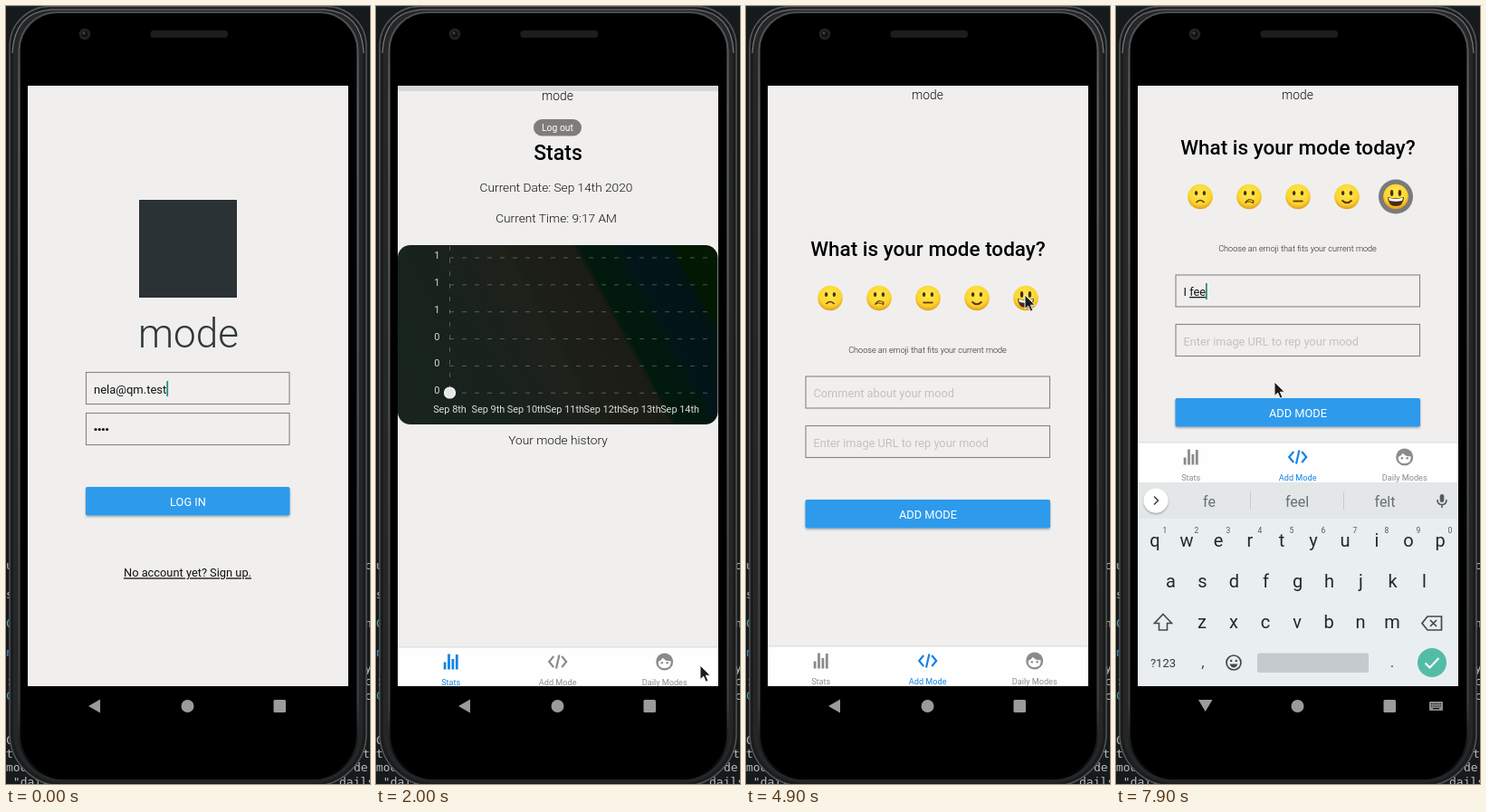
An HTML page that plays this animation: 402 by 859 pixels, repeating every 8 s.

```html
<!DOCTYPE html>
<html lang="en">
<head>
<meta charset="utf-8">
<title>Mood app demo</title>
<style>
html, body { margin: 0; width: 100%; height: 100%; overflow: hidden; background: #171a1b; }
svg { display: block; width: 402px; height: 859px; }
text { font-family: Roboto, "Noto Sans", sans-serif; white-space: pre; }
.mono { font-family: "DejaVu Sans Mono", "Noto Sans Mono", monospace; font-size: 13px; }
</style>
</head>
<body>
<svg id="stage" viewBox="0 0 402 859" xmlns="http://www.w3.org/2000/svg"></svg>
<script>
const LOOP = 8000, STEP = 100;
const INK = '#111', GREY = '#8c8b8a', BLUE = '#1683e4', KEY = '#22292c', PAPER = '#f0efee';

const tag = (name, attrs, body = '') =>
  `<${name} ${Object.entries(attrs).map(([k, v]) => `${k}="${v}"`).join(' ')}>${body}</${name}>`;
const rect = (x, y, width, height, fill, more) => tag('rect', { x, y, width, height, fill, ...more });
const disc = (cx, cy, r, fill, more) => tag('circle', { cx, cy, r, fill, ...more });
const path = (d, fill, more) => tag('path', { d, fill, ...more });
const line = (d, stroke, w, more) => path(d, 'none', { stroke, 'stroke-width': w, ...more });
const text = (x, y, s, size, fill, more) => tag('text', { x, y, 'font-size': size, fill, ...more }, s);
const mid = (x, y, s, size, fill, weight = 400, more) =>
  text(x, y, s, size, fill, { 'text-anchor': 'middle', 'font-weight': weight, ...more });
const group = (id, body, more) => tag('g', { id, ...more }, body);
const at = (x, y, body) => tag('g', { transform: `translate(${x} ${y})` }, body);

// Outline with separate top and bottom corner radii
const shell = (l, t, r, b, rt, rb) =>
  `M${l} ${t + rt}A${rt} ${rt} 0 0 1 ${l + rt} ${t}H${r - rt}A${rt} ${rt} 0 0 1 ${r} ${t + rt}` +
  `V${b - rb}A${rb} ${rb} 0 0 1 ${r - rb} ${b}H${l + rb}A${rb} ${rb} 0 0 1 ${l} ${b - rb}Z`;

const field = (x, y, w) =>
  rect(x + .5, y + .5, w - 1, 35, 'none', { stroke: '#858483', 'stroke-width': 1.1 });
const button = (x, y, w, id, label) =>
  rect(x, y, w, 31.5, '#2d9aec', { rx: 2, filter: 'url(#drop)' }) +
  mid(201, y + 20.7, label, 12.8, '#fff', 400, { id });

// Terminal behind the phone
const logA = [[622, 'u', 396, 'c'], [654, 's', 396, ''], [686, 'C', 396, 'n', '#58a8c8'], [718, 'n', 396, '', '#3b9bd8'],
  [735, '', 396, 'y'], [750, ':', 396, 'c'], [766, 'C', 396, 'c', '#4aa3a8'], [815, 'C', 396, ''],
  [830, 't', 394, 't'], [845, 'mod', 384, 'de'], [861, ' "daily', 368, 'dails']];
const logB = [[622, ':', 396, 'c'], [638, 'u', 396, ''], [670, '|', 396, ''], [686, 'C', 396, 'n', '#58a8c8'],
  [702, '-', 396, ''], [718, 'n', 396, '', '#3b9bd8'], [750, ':', 396, 'y'], [766, 'u', 396, 'c', '#4aa3a8'],
  [798, 's', 396, '', '#4aa3a8'], [830, 'C', 392, 'an'], [845, 'tec', 384, 'At'], [861, 'modes', 368, 'mode']];
const log = rows => rows.map(([y, a, x, b, c = '#b9bdbf']) =>
  text(0, y, a, 13, c, { class: 'mono' }) + text(x, y, b, 13, '#b9bdbf', { class: 'mono' })).join('');

const phone =
  path(shell(4, .5, 398, 861, 44, 58), '#1b1c1d', { stroke: '#55585a', 'stroke-width': 1.4 }) +
  path(shell(8, 3, 394, 858, 42, 56), '#252627') +
  path(shell(14.5, 7, 388.5, 853, 42, 50), '#000', { stroke: 'url(#rim)', 'stroke-width': 2.2 }) +
  line('M7 52Q9 7 50 4H352Q393 7 395 52', '#77797b', 1.2) +
  disc(87, 31, 6.3, '#222326') + disc(87, 31, 3.6, '#101216') + disc(86, 30, 1.4, '#44464d') +
  rect(159.5, 27, 85.5, 8, '#1d1d1e', { rx: 3.5 });

const topLine = rect(24, 88, 354, 1, '#f8f0f8');

const login = rect(24, 88, 354, 663, PAPER) + topLine +
  rect(147, 214, 108, 108, '#2a3235') +
  mid(201.5, 377, 'mode', 44, '#2f373b', 300) +
  field(88, 404, 225.5) + field(88, 449, 225.5) +
  text(97, 427.5, 'nela@qm.test', 13, INK, { id: 'mail' }) +
  rect(0, 414, 1.8, 17, '#2b8d80', { id: 'mailCaret' }) +
  [0, 1, 2, 3].map(i => disc(99 + i * 4.2, 467.5, 1.6, INK)).join('') +
  button(88, 531, 225.5, 'enter', 'LOG IN') +
  mid(200.5, 630.3, 'No account yet? Sign up.', 12.83, INK, 400, { 'text-decoration': 'underline' });

const days = ['8th', '9th', '10th', '11th', '12th', '13th', '14th'];
const gridY = i => 277 + i * 29.85;
const dash = { 'stroke-dasharray': '5 9', opacity: .27 };
const stats =
  rect(174, 124, 53, 18.5, '#7f7d7b', { rx: 9.2 }) +
  mid(200.5, 137.4, 'Log out', 10.4, '#fff') +
  mid(201, 169.3, 'Stats', 23, '#000', 500) +
  mid(199, 204, 'Current Date: Sep 14th 2020', 13.7, INK, 300) +
  mid(199, 237.5, 'Current Time: 9:17 AM', 13.7, INK, 300) +
  rect(24, 263, 353.5, 198, 'url(#bands)', { rx: 14 }) +
  [0, 1, 2, 3, 4, 5].map(i => line(`M81 ${gridY(i)}H371`, '#fff', 1, dash) +
    text(70.5, gridY(i) + 1, i < 3 ? '1' : '0', 11, '#d5d7d5', { 'text-anchor': 'end' })).join('') +
  line('M81.5 264V426', '#fff', 1, dash) +
  days.map((d, i) => mid(81.5 + i * 42.35, 447.7, 'Sep ' + d, 10.9, '#dcdedc')).join('') +
  disc(81.5, 426, 6, '#e6e6e6', { stroke: '#fafafa', 'stroke-width': 1.2 }) +
  mid(201, 483, 'Your mode history', 13.7, INK, 300);

const mouths = [
  line('M-4.5 6.5Q0 1.5 4.5 6.5', '#5b3a10', 1.7),
  line('M-4.5 7Q-1 .8 5 4.8L4.4 7Q0 4-4.5 7Z', '#5b3a10', 1.2),
  line('M-5.5 5H5.5', '#5b3a10', 1.8),
  line('M-5.5 4Q0 9.5 5.5 4', '#5b3a10', 1.9),
  path('M-9 .5Q0 3 9 .5Q8.500 10.500 0 10.500T-9 .5Z', '#4b2b12') +
  path('M-8 1.300Q0 3.500 8 1.300L7 4.600Q0 6-7 4.600Z', '#fff')
];
const emoji = (mouth, i) => at(93 + 54 * i, 322.5,
  disc(0, 0, 13.8, 'url(#skin)') +
  [-4.4, 4.4].map(x => tag('ellipse', { cx: x, cy: -4, rx: 1.7, ry: i === 4 ? 3.4 : 2.6, fill: '#4a3010' })).join('') + mouth);
const add =
  mid(201, 275.5, 'What is your mode today?', 22.5, '#000', 500) +
  disc(309, 322.5, 19, '#7c7a79', { id: 'picked' }) +
  mouths.map(emoji).join('') +
  mid(200.5, 382.6, 'Choose an emoji that fits your current mode', 9.1, '#222', 300) +
  field(65.500, 408.5, 270.5) + field(65.5, 463, 270.5) +
  text(74.5, 432, 'Comment about your mood', 12.75, '#c3c1c0', { id: 'hint' }) +
  text(74.5, 432, '', 12.75, INK, { id: 'typed' }) +
  rect(74.5, 418, 1.8, 18, '#2b8d80', { id: 'caret' }) +
  text(74.5, 486.5, 'Enter image URL to rep your mood', 12.75, '#c3c1c0') +
  button(65.5, 545, 270.5, 'add', 'ADD MODE');

const code = line('M-4.500-6L-9.500 0L-4.500 6M4.500-6L9.500 0L4.500 6M1.700-7.500L-1.700 7.500', 'currentColor', 2.2);
const bars = [[-8, 8], [-3.6, 17], [.8, 11.5], [5.2, 16.5]].map(([x, h]) => rect(x, 8.5 - h, 2.8, h, 'currentColor')).join('');
const face = disc(0, 0, 9.5, 'currentColor') +
  path('M-7 0Q-3.500-1.200-2-4.200Q2 .2 6.800-.9Q8 7 0 7.300Q-7.500 7-7 0Z', '#fff') +
  disc(-2.9, 1.3, 1.2, 'currentColor') + disc(2.9, 1.3, 1.2, 'currentColor');
const tabs = rect(24, 706, 354, 2, '#e2e1e0') + rect(24, 707.5, 354, 43.5, '#fefefe') +
  [['Stats', bars], ['Add Mode', code], ['Daily Modes', face]].map(([label, icon], i) =>
    tag('g', { class: 'tab', color: GREY }, at(82.7 + 118 * i, 723, icon) +
      mid(82.7 + 118 * i, 748.600, label, 9.15, 'currentColor'))).join('');

const rows = ['qwertyuiop', 'asdfghjkl', 'zxcvbnm'];
const rowX = [43, 60.5, 95], rowY = [596.5, 641.5, 687];
const keys = rows.map((row, r) => [...row].map((c, i) =>
  mid(rowX[r] + i * 35, rowY[r], c, 20, KEY, 400, { class: 'key' })).join('')).join('') +
  [...'1234567890'].map((c, i) => mid(54 + i * 35, 581.5, c, 8.5, '#50585b')).join('');
const mic = at(360, 546, rect(-2.3, -7, 4.6, 9, '#555d60', { rx: 2.3 }) +
  line('M-5 -1Q-5 4.500 0 4.500T5-1M0 4.500V8', '#555d60', 1.6));
const smile = disc(0, 0, 8, 'none', { stroke: '#41494c', 'stroke-width': 1.7 }) +
  disc(-2.8, -2, 1.2, '#41494c') + disc(2.8, -2, 1.2, '#41494c') + path('M-4.500 1.500H4.500Q3 5.500 0 5.500T-4.500 1.500Z', '#41494c');
const tools =
  line('M46.500 541.500L42 546L46.500 550.500', '#41494c', 1.7) +
  disc(90, 544, 5, 'none', { stroke: '#5f676a', 'stroke-width': 2 }) + line('M94 548L99 553', '#5f676a', 2.2) +
  at(143, 546, line('M-6.500-6.500H6.500V2.500L2.500 6.500H-6.500Z', '#5f676a', 1.800) +
    line('M-3.500 1Q0 4.500 3.500 1M-2.800-3V-1.500M2.800-3V-1.500', '#5f676a', 1.5)) +
  mid(193.5, 550, 'GIF', 12, '#5f676a', 900) +
  rect(239, 539, 14, 14, '#6a7275') +
  line('M278.500 536V556', '#d3d8da', 1) +
  [304.5, 310, 315.5].map(x => disc(x, 546, 1.9, '#5f676a')).join('');
const words = line('M42 541.500L46.500 546L42 550.500', '#41494c', 1.7) +
  line('M148.500 536V556M251.500 536V556', '#c6cccf', 1) +
  [103, 200, 297].map(x => mid(x, 552.5, '', 16, '#687073', 400, { class: 'word' })).join('');
const keyboard =
  rect(24, 526, 354, 225, '#e9eff0') + rect(24, 526, 354, 40, '#e3e7e8') +
  disc(44, 546, 13.5, '#fff', { filter: 'url(#drop)' }) +
  group('tools', tools) + group('words', words) + mic + keys +
  path('M52 671.500L61.500 681.500H56.500V689H47.500V681.500H42.500Z', KEY, { id: 'shift', stroke: '#41494c', 'stroke-width': 1.6 }) +
  line('M344 674H359.500V689H344L338 681.500ZM347 678L354 685M354 678L347 685', '#41494c', 1.7) +
  mid(52, 730, '?123', 13, '#30383b') + mid(96, 730, ',', 17, '#41494c') + mid(305, 730, '.', 17, '#41494c') +
  at(130, 725, smile) + rect(156, 714.5, 123, 21.5, '#c4cacd', { rx: 2 }) +
  disc(349, 725, 16, '#53bca7') + line('M341.500 725.500L346.500 730.500L356.500 720', '#fff', 2);

const nav = group('back', path('M91 773L104 765.500V780.500Z', '#9b9b9b')) +
  group('down', path('M91 766H106.500L98.700 779Z', '#9b9b9b') +
    rect(346, 768, 15, 10, '#8a8a8a', { rx: 1 }) +
    line('M348 770.500H359.500M348 773H359.500', '#000', 1.2, { 'stroke-dasharray': '1.2 1.2' }) + line('M350 775.700H357', '#000', 1.1)) +
  disc(200.5, 773, 7, '#9b9b9b') + rect(295.5, 766, 13.5, 14, '#9b9b9b', { rx: 1.500 });

const stop = (offset, c) => tag('stop', { offset, 'stop-color': c });
const defs = `<defs>
<filter id="drop" x="-10%" y="-20%" width="120%" height="160%"><feDropShadow dx="0" dy="1.3" stdDeviation="1.1" flood-opacity=".35"/></filter>
<clipPath id="screen"><rect x="24" y="88" width="354" height="663"/></clipPath>
<clipPath id="reveal"><rect id="revealBox" x="24" y="88" width="354" height="663"/></clipPath>
<linearGradient id="rim" x1="0" y1="0" x2="0" y2="1">${stop(0, '#4a4c4e')}${stop(.12, '#5e6062')}${stop(.9, '#3c3e40')}${stop(1, '#000')}</linearGradient>
<radialGradient id="skin" cx=".5" cy=".35" r=".65">${stop(0, '#ffe84a')}${stop(.7, '#fbd52f')}${stop(1, '#e39b1b')}</radialGradient>
<linearGradient id="bands" gradientUnits="userSpaceOnUse" x1="-86" y1="264" x2="269.5" y2="68.5">
${[[0, '#19241f'], [.24, '#17231c'], [.36, '#1a221b'], [.48, '#1f211b'], [.5, '#1c1f18'], [.655, '#1b1c15'], [.67, '#02190d'],
  [.752, '#02180f'], [.765, '#021518'], [.88, '#031416'], [.895, '#031703'], [1, '#041a02']].map(s => stop(...s)).join('')}
</linearGradient></defs>`;

document.getElementById('stage').innerHTML = defs +
  rect(0, 0, 402, 859, '#171a1b') + rect(0, 0, 402, 2, '#10252b') +
  group('logA', log(logA)) + group('logB', log(logB)) + phone +
  tag('g', { 'clip-path': 'url(#screen)' },
    group('login', login) + rect(24, 88, 354, 663, '#000', { id: 'shade' }) +
    tag('g', { 'clip-path': 'url(#reveal)' }, group('home',
      rect(24, 88, 354, 690, PAPER) + topLine + mid(200.5, 102.700, 'mode', 13.8, INK, 300) +
      group('stats', stats) + group('add', add) + group('tabs', tabs)))) +
  group('keyboard', keyboard) + nav +
  group('cursor', path('M0 0V15.500L3.700 12.200L6.300 18.200L8.900 17L6.400 11.200H11.200Z', '#1c1c1c', { stroke: '#f4f4f4', 'stroke-width': 1 }));

const $ = id => document.getElementById(id);
const all = name => [...document.getElementsByClassName(name)];
const show = (id, on) => $(id).setAttribute('display', on ? 'inline' : 'none');
const move = (id, x, y) => $(id).setAttribute('transform', `translate(${x} ${y})`);
const last = (table, t) => table.filter(row => row[0] <= t).pop();

// time, x, y
const route = [[200, 412, 378], [1100, 215, 545], [1500, 302, 595], [1600, 302, 595], [2000, 358, 728], [2300, 358, 728],
  [2600, 362, 677], [2900, 358, 688], [3100, 358, 688], [3500, 221, 714], [3800, 221, 714], [3900, 213, 718],
  [4000, 213, 718], [4400, 176, 370], [4500, 176, 370], [4900, 308, 319], [5200, 308, 319], [5700, 175, 415]];
// time, settled text, text being composed, suggestions
const typing = [[0, '', '', ['', '', '']], [7000, '', 'I', ['I', "I'm", "It's"]], [7200, 'I ', '', ['am', 'have', 'will']],
  [7600, 'I ', 'f', ['f', 'feel', 'for']], [7800, 'I ', 'fe', ['fe', 'feel', 'felt']], [7900, 'I ', 'fee', ['fe', 'feel', 'felt']]];

function pointer(t) {
  const i = route.findIndex(p => p[0] > t);
  if (i < 0) return route[route.length - 1].slice(1);
  if (!i) return [430, 378];
  const [a, b] = [route[i - 1], route[i]];
  const k = (t - a[0]) / (b[0] - a[0]), e = k * k * (3 - 2 * k);
  return [a[1] + (b[1] - a[1]) * e, a[2] + (b[2] - a[2]) * e];
}

// cubic-bezier(.35, .45, 0, 1)
function ease(x) {
  if (x <= 0 || x >= 1) return x <= 0 ? 0 : 1;
  let lo = 0, hi = 1, u;
  for (let i = 0; i < 24; i++) {
    u = (lo + hi) / 2;
    if (1.05 * u * (1 - u) ** 2 + u ** 3 < x) lo = u; else hi = u;
  }
  return 1.35 * u * (1 - u) ** 2 + 3 * u * u * (1 - u) + u ** 3;
}

function render(t) {
  const busy = t >= 1200, adding = t >= 4000, open = t >= 6100;
  const later = t >= 1100 && t < 1900;
  show('logA', !later);
  show('logB', later);

  $('enter').textContent = busy ? 'LOADING...' : 'LOG IN';
  $('mailCaret').setAttribute('x', 97 + $('mail').getComputedTextLength());
  show('mailCaret', !busy && t % 1000 < 500);

  const p = ease((t - 1662) / 425), off = 663 * (1 - p);
  move('login', 0, -13 * p);
  $('shade').setAttribute('opacity', .1 * p);
  $('revealBox').setAttribute('y', 88 + off);
  move('home', 0, Math.ceil(.041 * off));

  show('stats', !adding);
  show('add', adding);
  move('add', 0, open ? -112 : 0);
  move('tabs', 0, open ? -225 : 0);
  all('tab').forEach((el, i) => el.setAttribute('color', i === +adding ? BLUE : GREY));
  show('picked', t >= 5200);

  const [, done, part, picks] = last(typing, t);
  const typed = done + part !== '';
  $('typed').innerHTML = done + `<tspan text-decoration="underline">${part}</tspan>`;
  show('hint', !typed);
  $('caret').setAttribute('x', 74.5 + (typed ? $('typed').getComputedTextLength() : 0));
  show('caret', t >= 6000 && !(t >= 6500 && t < 7000));

  show('keyboard', open);
  move('keyboard', 0, t < 6200 ? 45 : t < 6300 ? 3.5 : 0);
  show('tools', !typed);
  show('words', typed);
  all('word').forEach((el, i) => el.textContent = picks[i]);
  const letters = rows.join('');
  all('key').forEach((el, i) => el.textContent = typed ? letters[i] : letters[i].toUpperCase());
  $('shift').setAttribute('fill', typed ? 'none' : '#41494c');
  show('back', !open);
  show('down', open);

  move('cursor', ...pointer(t));
}

const start = performance.now();
function tick() {
  const t = (performance.now() - start) % LOOP;
  render(Math.floor(t / STEP) * STEP);
  requestAnimationFrame(tick);
}
tick();
</script>
</body>
</html>
```
